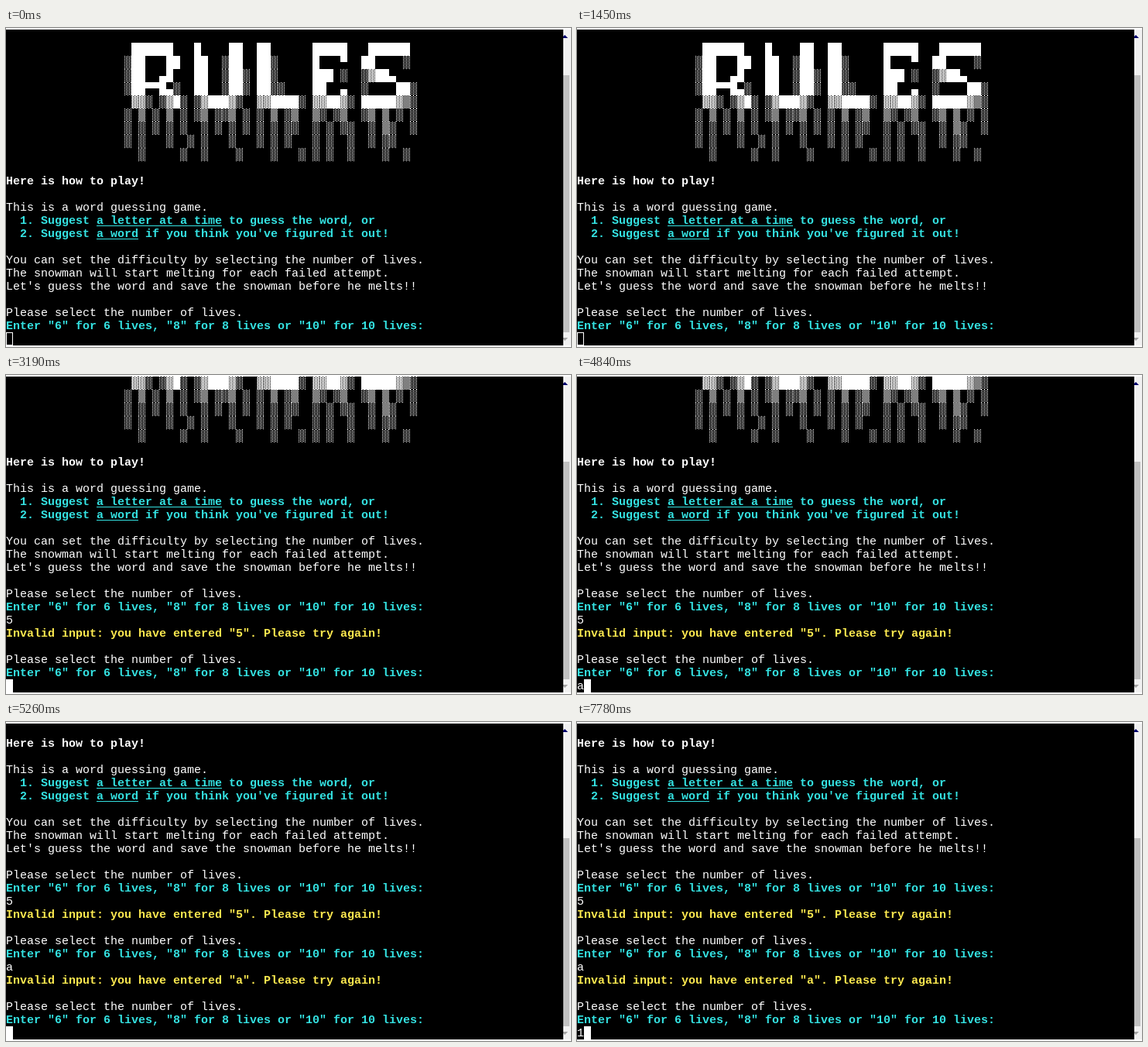
These frames come from a looping animation (730x412 px, 8 s). An HTML page with a canvas:

```html
<!DOCTYPE html>
<html lang="en">
<head>
<meta charset="utf-8">
<title>Word game rules</title>
<style>
html, body { margin: 0; width: 100%; height: 100%; overflow: hidden; background: #fff; }
canvas { display: block; }
</style>
</head>
<body>
<canvas id="stage" width="730" height="412"></canvas>
<script>
const ctx = document.getElementById('stage').getContext('2d', { alpha: false });
const CELL_W = 9, CELL_H = 17, TOP = 2, ROWS = 24, LOOP = 8000;
const WHITE = '#fff', CYAN = '#34e2e2', YELLOW = '#fce94f';

const banner = [
  ' ██████   █    ██  ██      █████   ██████ ',
  '░██   ██  ██  ░██  ██░     █   ▀  ██    ░ ',
  '░██  ▄█   ██  ░██░ ██░     ███ ░  ░▓██▄   ',
  '░██▀▀█▄░  ██  ░██░ ██░░    ██  ▄  ░    ██░',
  ' ▓▓░ ░▓█░ ░▓███▓░  ▓▓████░ ▓▓██▓░ █████▓▒░',
  '░ ▒ ░ ▒ ░ ░▒ ░░▒ ░ ░ ▒ ░▒  ▒░ ░▒  ░▒ ▒ ░ ░',
  '░ ░ ░ ░ ░  ░ ░ ░ ░ ░ ░ ░░  ░ ░ ░░  ░ ▒░  ░',
  '░ ░   ░  ░ ░   ░   ░ ░ ░   ░ ░  ░  ░ ░░   ',
  '  ░     ░  ░    ░    ░   ░ ░ ░  ░    ░  ░ '
];

// Which pixels of a block character are lit
const lit = {
  '█': () => true,
  '▀': (x, y) => y < 8,
  '▄': (x, y) => y > 8,
  '░': (x, y) => (x + y % 2 * 2) % 4 === 0,
  '▒': (x, y) => (x + y) % 2 === 0,
  '▓': (x, y) => (x + y % 2 * 2) % 4 !== 0
};

const plain = text => ({ text, color: WHITE });
const bold = (text, color, underline = '') => ({ text, color, underline, bold: true });
const blank = plain('');
const prompt = [
  plain('Please select the number of lives.'),
  bold('Enter "6" for 6 lives, "8" for 8 lives or "10" for 10 lives:', CYAN)
];
const invalid = key => bold(`Invalid input: you have entered "${key}". Please try again!`, YELLOW);

const intro = [
  blank,
  ...banner.map(blocks => ({ blocks })),
  blank,
  bold('Here is how to play!', WHITE),
  blank,
  plain('This is a word guessing game.'),
  bold('  1. Suggest a letter at a time to guess the word, or', CYAN, 'a letter at a time'),
  bold("  2. Suggest a word if you think you've figured it out!", CYAN, 'a word'),
  blank,
  plain('You can set the difficulty by selecting the number of lives.'),
  plain('The snowman will start melting for each failed attempt.'),
  plain("Let's guess the word and save the snowman before he melts!!"),
  blank,
  ...prompt
];
const second = [...intro, plain('5'), invalid('5'), blank, ...prompt];
const third = [...second, plain('a'), invalid('a'), blank, ...prompt];

function screenAt(t) {
  if (t < 2640) return [...intro, blank];
  if (t < 3190) return [...intro, plain('5')];
  if (t < 4840) return [...second, blank];
  if (t < 5190) return [...second, plain('a')];
  if (t < 5260) return third.slice(0, -1);
  return [...third, plain(t < 7780 ? '' : '1')];
}

function rect(color, x, y, w, h) {
  ctx.fillStyle = color;
  ctx.fillRect(x, y, w, h);
}

function drawBlocks(blocks, top) {
  [...blocks].forEach((char, i) => {
    const on = lit[char], left = (17 + i) * CELL_W;
    if (!on) return;
    for (let y = 0; y < CELL_H; y++)
      for (let x = 0; x < CELL_W; x++)
        if (on(x, y)) rect(WHITE, left + x, top + y, 1, 1);
  });
}

function drawLine(line, top) {
  if (line.blocks) return drawBlocks(line.blocks, top);
  ctx.font = `${line.bold ? 'bold ' : ''}15px "Liberation Mono", "Courier New", monospace`;
  ctx.fillStyle = line.color;
  ctx.fillText(line.text, 0, top + 13);
  if (line.underline)
    rect(line.color, line.text.indexOf(line.underline) * CELL_W, top + 15, line.underline.length * CELL_W, 1);
}

function drawArrow(color, base, tip) {
  ctx.fillStyle = color;
  ctx.beginPath();
  ctx.moveTo(718, base);
  ctx.lineTo(722, tip);
  ctx.lineTo(726, base);
  ctx.fill();
}

function drawScrollbar(lineCount) {
  // Three earlier lines lie above the first one
  const thumb = Math.round(374 * ROWS / (lineCount + 3));
  rect('#f1f1f1', 713, TOP, 17, 408);
  rect('#c1c1c1', 715, 393 - thumb, 13, thumb);
  drawArrow('#00006b', 13, 9);
  drawArrow('#a3a3a3', 400, 404);
}

function draw(t) {
  const lines = screenAt(t);
  rect(WHITE, 0, 0, 730, 412);
  drawScrollbar(lines.length);
  rect('#000', 0, TOP, 720, ROWS * CELL_H);
  lines.slice(-ROWS).forEach((line, row) => drawLine(line, TOP + row * CELL_H));

  const x = lines[lines.length - 1].text.length * CELL_W;
  const y = TOP + (ROWS - 1) * CELL_H;
  rect(WHITE, x, y, CELL_W, CELL_H);
  const focused = t >= 1600;
  if (!focused) rect('#000', x + 1, y + 1, CELL_W - 2, CELL_H - 2);
}

const start = performance.now();
function tick() {
  draw((performance.now() - start) % LOOP);
  requestAnimationFrame(tick);
}
tick();
</script>
</body>
</html>
```
